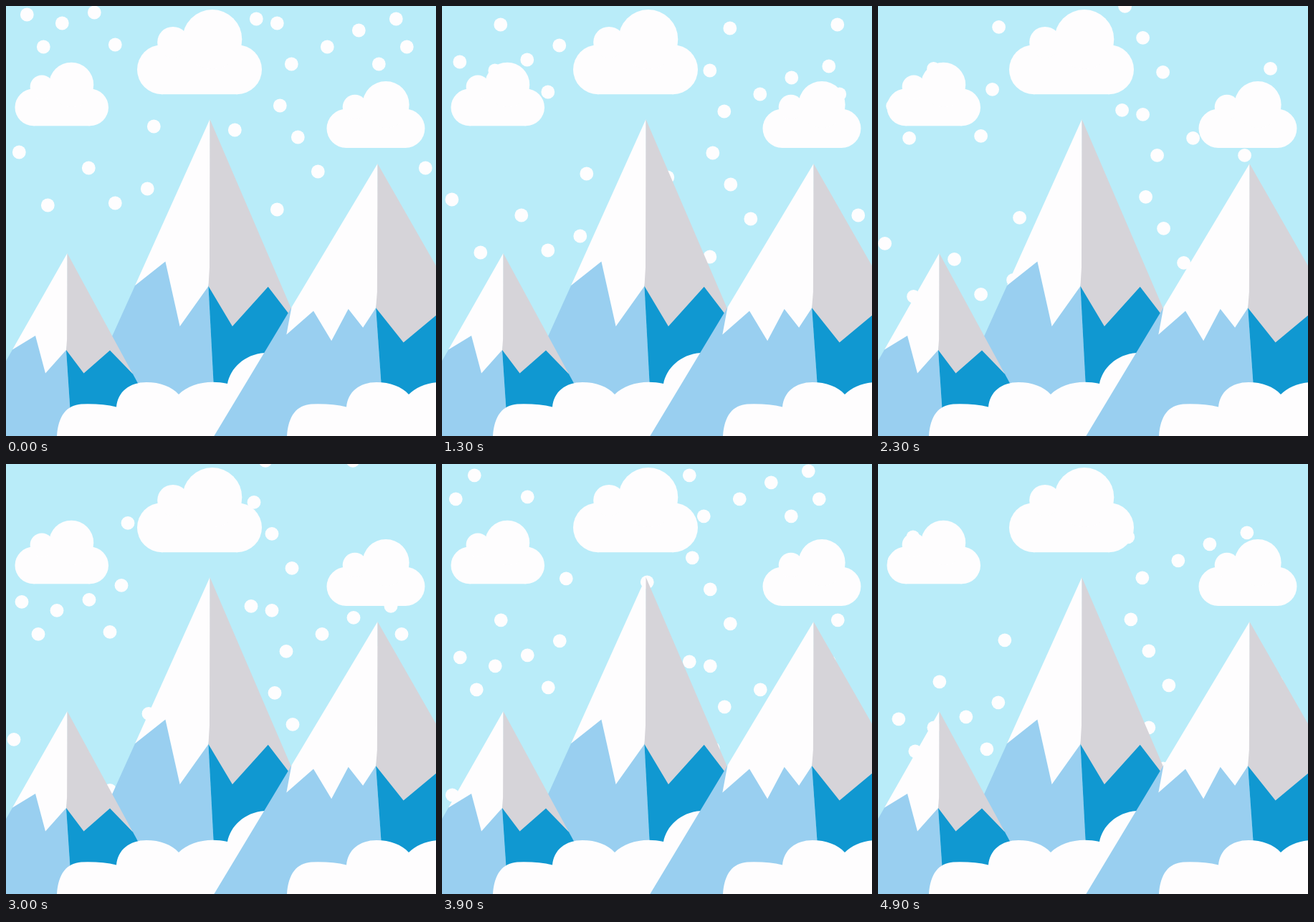
Recreate the animation shown at these times as an HTML page with a canvas. Size 600 by 600 pixels, loop 4.95 s.

```html
<!DOCTYPE html>
<html>
<head>
<meta charset="utf-8">
<title>Snowy mountains</title>
<style>
html, body { margin: 0; width: 100%; height: 100%; overflow: hidden; background: #b9ecf9; }
canvas { display: block; width: 600px; height: 600px; }
</style>
</head>
<body>
<canvas id="stage" width="600" height="600"></canvas>
<script>
const ctx = document.getElementById('stage').getContext('2d');
const LOOP = 4950, STEP = 50;
const SKY = '#b9ecf9', SNOW = '#fefdfe', SHADE = '#d6d4d9', LIGHT = '#99cff0', DARK = '#1098d1';

// One flock of flakes; a second copy follows above it.
const flock = [
  [78, 24], [152, 54], [52, 57], [206, 168], [319, 173], [378, 24], [398, 81], [382, 139],
  [407, 183], [448, 57], [492, 34], [544, 18], [559, 57], [520, 81], [18, 204], [115, 226],
  [58, 278], [152, 275], [197, 255], [378, 284], [435, 231], [585, 226]
];

// Distance covered when speed rises from 0 to 1 between steps a and b.
function ramp(t, a, b) {
  if (t <= a) return 0;
  return t < b ? (t - a) ** 2 / (2 * (b - a)) : t - (a + b) / 2;
}

function disc(x, y, r) {
  ctx.beginPath();
  ctx.arc(x, y, r, 0, 7);
  ctx.fill();
}

function skyCloud(left, bottom, scale) {
  ctx.save();
  ctx.translate(left, bottom);
  ctx.scale(scale, scale);
  ctx.fillStyle = SNOW;
  disc(34.5, -34.5, 34.5);
  disc(139.5, -34.5, 34.5);
  ctx.fillRect(34.5, -69, 105, 69);
  disc(104.8, -76.7, 41.5);
  disc(50, -72.5, 21.8);
  ctx.restore();
}

function groundCloud(dx) {
  ctx.fillStyle = SNOW;
  ctx.fill(new Path2D(`M${71 + dx} 600c2-29 14-43 34-44.5q28-1 49 4c2-21 18-34.5 42-34.5
    c19 0 35 6 45 17c15-15 41-21 68-15c4-21 23-41 52-43v116z`));
}

function snowfall(step) {
  const start = ramp(step, 0, 7);
  const dx = 0.3 - 0.21 * start + 0.39 * ramp(step, 46, 49.6);
  const dy = 3.07 * start + 1.23 * ramp(step, 49, 52.7);
  ctx.fillStyle = SNOW;
  for (const [x, y] of flock) {
    disc(x + dx, y + dy, 9.4);
    disc(x + dx - 29, y + dy - 266, 9.4);
  }
}

// All mountains share one outline, scaled from the peak; only the left snow line varies.
function mountain(px, py, sx, sy, ...snowLine) {
  const poly = (color, ...points) => {
    ctx.fillStyle = color;
    ctx.beginPath();
    for (const [x, y] of points) ctx.lineTo(px + x * sx, py + y * sy);
    ctx.fill();
  };
  const peak = [0, 0], ridge = [-1.5, 135], foot = [8.5, 285];
  const leftEdge = [-76.5, 134.5], rightEdge = [91.5, 168.5];
  poly(LIGHT, leftEdge, [-40, 100], [-1, 100], ridge, foot, [-171, 300]);
  poly(DARK, ridge, [30, 100], rightEdge, [163, 300], foot);
  poly(SNOW, peak, leftEdge, ...snowLine, ridge, [1, 120]);
  poly(SHADE, peak, [-0.4, 120], ridge, [23, 167.5], [59.5, 135.5], rightEdge);
}

function draw() {
  const time = performance.now() % LOOP;
  ctx.fillStyle = SKY;
  ctx.fillRect(0, 0, 600, 600);
  skyCloud(183, 123.2, 1);
  skyCloud(12.5, 167.3, 0.75);
  skyCloud(447.5, 198, 0.787);
  snowfall(Math.max(0, Math.floor(time / STEP) - 1));
  mountain(284.5, 158, 1.365, 1.725, [-45.5, 115], [-30.7, 167.5]);
  mountain(85.5, 345, 1, 1, [-44.5, 115], [-30.5, 167.5]);
  groundCloud(0);
  mountain(518.5, 220, 1.57, 1.49, [-81, 160], [-57, 138], [-41, 166], [-26, 136], [-13, 153.5]);
  groundCloud(321);
  requestAnimationFrame(draw);
}
draw();
</script>
</body>
</html>
```
